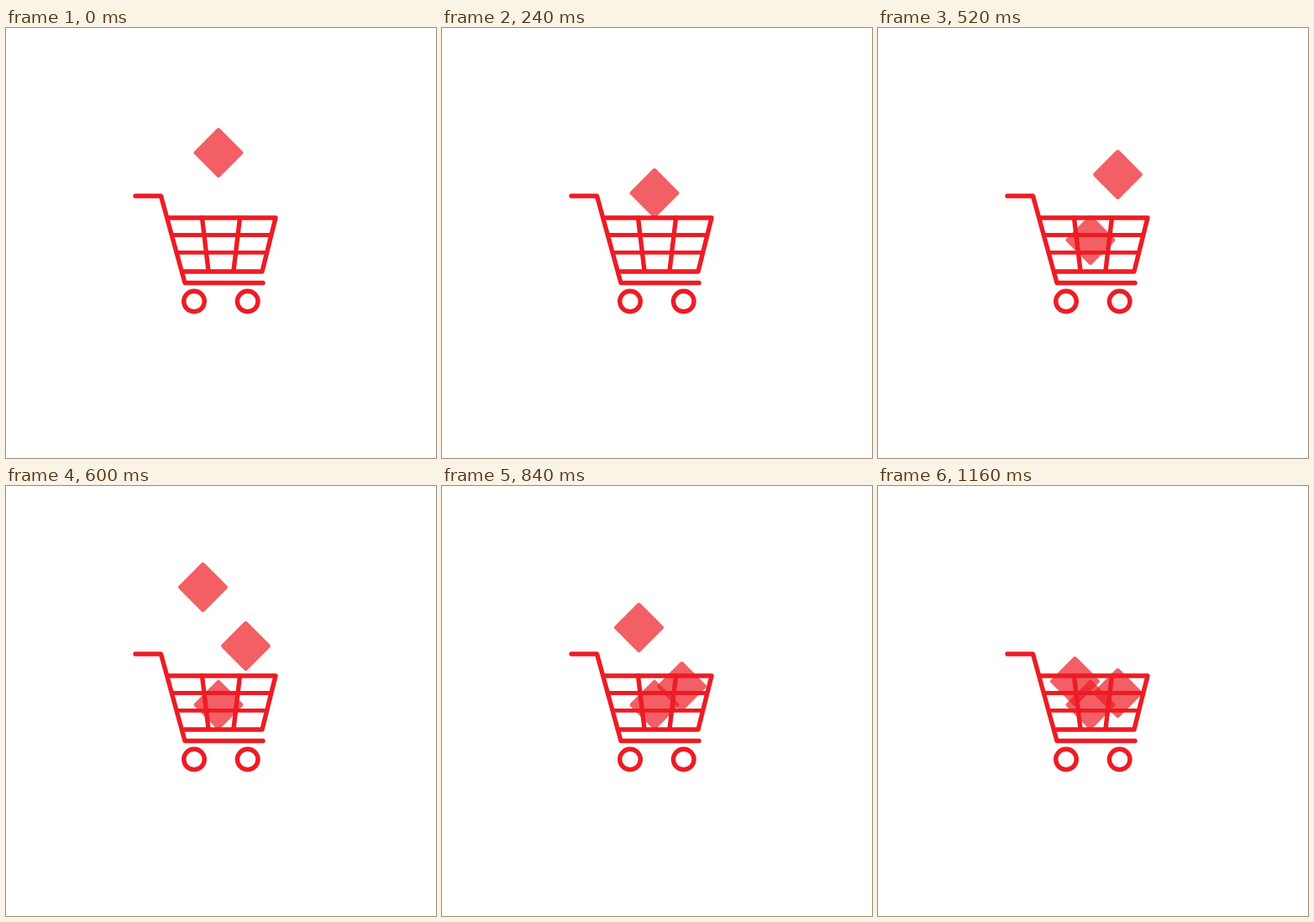
Animation of 512x512 px, one loop 1200 ms. Source, as an HTML page:

```html
<!DOCTYPE html>
<html>
<head>
<meta charset="utf-8">
<style>
  html, body { margin: 0; width: 100%; height: 100%; overflow: hidden; background: #fff; }
  svg { display: block; width: 100%; height: 100%; }
  .box { fill: #ed1c24; fill-opacity: .7; }
  .cart { fill: none; stroke: #ed1c24; stroke-width: 5.4; stroke-linecap: round; stroke-linejoin: round; }
</style>
</head>
<body>
<svg viewBox="0 0 512 512">
  <g id="boxes"></g>
  <g class="cart">
    <path d="M154 200H184.500L213 303.500H306"/>
    <path d="M194 226H321L305 290H211"/>
    <path d="M199 246.500H315M204 267.300H310" stroke-width="4.800"/>
    <path d="M233.500 226L241 289M278.500 226L271 289"/>
    <circle cx="224" cy="325.500" r="12.300"/>
    <circle cx="287.700" cy="325.500" r="12.300"/>
  </g>
</svg>
<script>
const LOOP = 1200, STEP = 40, SPEED = 0.2, SIDE = 43;

// Each box appears at `start`, falls steadily and rests at `floor`.
const boxes = [
  { x: 253, top: 148.5, floor: 260.5, start: 0 },
  { x: 285.5, top: 134.5, floor: 246.5, start: 320 },
  { x: 234.5, top: 120.5, floor: 232.5, start: 600 }
];

for (const box of boxes) {
  box.el = document.createElementNS("http://www.w3.org/2000/svg", "rect");
  const attrs = { class: "box", x: -SIDE / 2, y: -SIDE / 2, width: SIDE, height: SIDE, rx: 2.5 };
  for (const name in attrs) box.el.setAttribute(name, attrs[name]);
  document.getElementById("boxes").append(box.el);
}

function draw(now) {
  const t = Math.floor((now % LOOP) / STEP) * STEP;
  for (const { el, x, top, floor, start } of boxes) {
    const y = Math.min(floor, top + (t - start) * SPEED);
    el.setAttribute("transform", `translate(${x} ${y}) rotate(45)`);
    el.setAttribute("visibility", t < start ? "hidden" : "visible");
  }
}

const begin = performance.now();
function tick() {
  draw(performance.now() - begin);
  requestAnimationFrame(tick);
}
tick();
</script>
</body>
</html>
```
